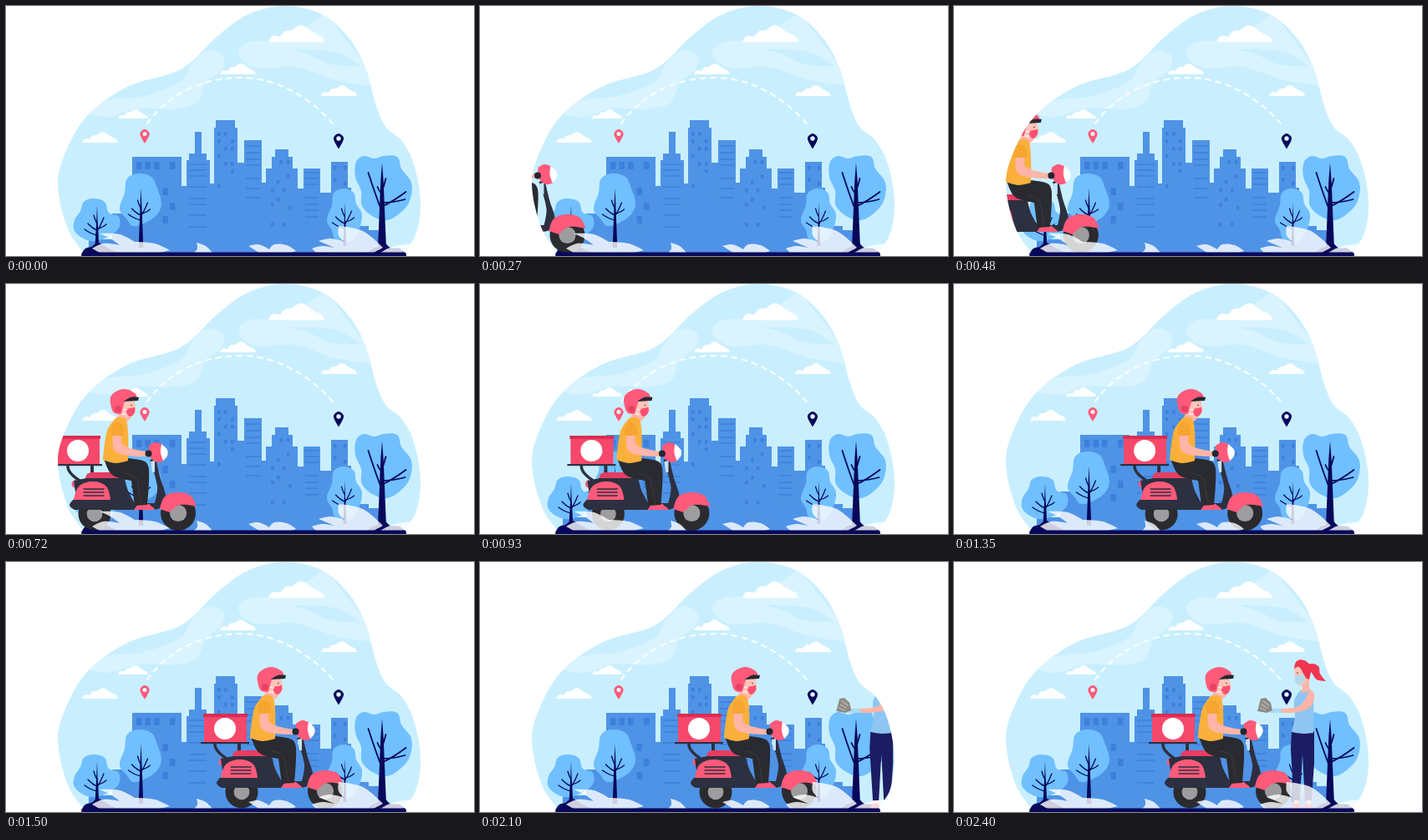
An HTML page with a canvas that plays this animation: 560x300 px, repeating every 4.73 s.

```html
<!DOCTYPE html>
<html lang="en">
<head>
<meta charset="utf-8">
<title>Scooter delivery</title>
<style>
html, body { margin: 0; width: 100%; height: 100%; overflow: hidden; background: #fff; }
canvas { display: block; }
</style>
</head>
<body>
<canvas id="stage" width="560" height="300"></canvas>
<script>
const LOOP = 4730, STEP = 30;
const ctx = document.getElementById('stage').getContext('2d');
const white = '#fff', city = '#4f93e6', shade = '#3d80dc', leaf = '#70bfff', navy = '#08085a';
const pink = '#ff5a7a', red = '#f0354f', skin = '#ffb5a7', dark = '#2d3040', black = '#2b2b2f';

// Closed curve through points [x, y]; a third value marks a sharp corner.
function outline(points) {
  const path = new Path2D(), n = points.length;
  const at = i => points[(i + n) % n];
  const handle = (i, to, side) => {
    const [x, y, corner] = at(i);
    if (corner) return [x, y];
    const dx = at(i + 1)[0] - at(i - 1)[0], dy = at(i + 1)[1] - at(i - 1)[1];
    const reach = side * Math.hypot(at(to)[0] - x, at(to)[1] - y) / 3 / (Math.hypot(dx, dy) || 1);
    return [x + dx * reach, y + dy * reach];
  };
  path.moveTo(at(0)[0], at(0)[1]);
  for (let i = 0; i < n; i++) {
    path.bezierCurveTo(...handle(i, i + 1, 1), ...handle(i + 1, i, -1), at(i + 1)[0], at(i + 1)[1]);
  }
  return path;
}
function shape(color, ...points) {
  ctx.fillStyle = color;
  ctx.fill(outline(points));
}
const poly = (color, ...points) => shape(color, ...points.map(([x, y]) => [x, y, 1]));
function box(color, x, y, w, h) {
  ctx.fillStyle = color;
  ctx.fillRect(x, y, w, h);
}
function disc(color, x, y, r) {
  ctx.fillStyle = color;
  ctx.beginPath();
  ctx.arc(x, y, r, 0, 2 * Math.PI);
  ctx.fill();
}
// Quadratic stroke from a to b, pulled towards c.
function line(color, width, a, b, c = a) {
  ctx.strokeStyle = color;
  ctx.lineWidth = width;
  ctx.lineCap = 'round';
  ctx.beginPath();
  ctx.moveTo(...a);
  ctx.quadraticCurveTo(...c, ...b);
  ctx.stroke();
}
function placed(x, y, scale, paint) {
  ctx.save();
  ctx.translate(x, y);
  ctx.scale(scale, scale);
  paint();
  ctx.restore();
}

const backdrop = outline([
  [95, 298, 1], [75, 270], [62, 214], [71, 176], [97, 132], [145, 97], [203, 79], [223, 66],
  [252, 37], [290, 10], [333, 0], [378, 10], [410, 38], [430, 74], [444, 123], [455, 146],
  [473, 161], [488, 190], [496, 237], [490, 275], [474, 298, 1]
]);
function inside(paint) {
  ctx.save();
  ctx.clip(backdrop);
  paint();
  ctx.restore();
}

const cloud = () => shape(white, [0, 13, 1], [3, 8.5], [9, 9, 1], [13, 4.5], [18, 4, 1],
  [25, 0], [32, 4, 1], [37, 7, 1], [41, 9], [43, 13, 1]);

function sky() {
  ctx.fillStyle = '#c9efff';
  ctx.fill(backdrop);
  const haze = '#d9f4ff';
  inside(() => {
    shape(haze, [90, 126, 1], [122, 113], [165, 108], [210, 90], [222, 70], [240, 54], [260, 60],
      [257, 77], [239, 92], [229, 115], [206, 123], [158, 123], [120, 133]);
    shape(haze, [278, 57], [292, 43], [330, 41], [382, 8, 1], [450, 97, 1], [395, 89], [345, 73], [298, 74]);
    shape('#c9efff', [340, 52, 1], [366, 52], [400, 57], [424, 72, 1], [388, 70], [362, 58]);
  });
  placed(314, 23, 1.56, cloud);
  placed(256, 69, 1, cloud);
  placed(134, 124, .84, cloud);
  placed(91, 151, 1, cloud);
  placed(377, 95, 1, cloud);
}

function route() {
  ctx.strokeStyle = white;
  ctx.lineWidth = 2;
  ctx.lineCap = 'round';
  ctx.setLineDash([6, 6.5]);
  ctx.beginPath();
  ctx.moveTo(169, 141);
  ctx.bezierCurveTo(195, 105, 235, 86, 281, 86);
  ctx.bezierCurveTo(325, 86, 368, 112, 394, 145);
  ctx.stroke();
  ctx.setLineDash([]);
}

// Each block stands on the ground: left, right, top.
const blocks = [
  [99, 127, 280], [127, 151, 249], [151, 210, 181], [210, 216, 216], [216, 244, 185], [219, 240, 177],
  [226, 234, 151], [244, 249, 213], [249, 277, 146], [251, 274, 137], [277, 285, 188], [285, 306, 161],
  [306, 311, 212], [311, 349, 195], [318, 343, 181], [322, 338, 172], [349, 356, 219], [356, 376, 195],
  [376, 389, 224], [389, 409, 187], [409, 413, 218], [413, 434, 264], [434, 448, 269]
];
function windows(x, gap, w, h, rows) {
  for (const [y, ...columns] of rows) columns.forEach(i => box(shade, x + i * gap, y, w, h));
}
function ledges(x, w, ...heights) {
  heights.forEach(y => box(shade, x, y - .8, w, 1.6));
}
function skyline() {
  for (const [left, right, top] of blocks) box(city, left, top, right - left, 296 - top);
  windows(156, 10.5, 6.5, 9, [[187, 0, 1, 2, 3.8], [218, 3], [236, 3.8], [252, 3]]);
  windows(253, 8, 3.5, 4.5, [[151, 0, 1], [160, 0, 2], [169, 1, 2], [178, 0], [187, 1, 2], [196, 2], [214, 0]]);
  windows(317, 7, 3.5, 4.5, [[185, 1.5, 2.7], [209, 1], [202, 2.7], [219, 0, 2], [230, 1], [236, 0], [240, 3], [260, 0, 2]]);
  windows(392, 12, 3.5, 4.5, [[192, 0, 1], [206, 0], [211, 1]]);
  ledges(219, 21, 190, 197, 204, 217, 231, 238, 251, 265);
  ledges(287, 17, 168, 176, 184, 191, 207, 219, 230);
  ledges(358, 16, 200, 207, 214, 230, 238, 245, 253);
}

function trunk(x, top, base, w) {
  poly(navy, [x - w, base], [x - w / 3, top + 22], [x, top], [x + w / 3, top + 22], [x + w, base]);
}
function branches(x, y, width, tips) {
  for (const [dx, dy, drop] of tips) line(navy, width, [x, y + drop], [x + dx, y + dy], [x + dx / 2, y + (dy + drop) / 2 + 2]);
}
const twigs = [[-15, -4, 3], [-11, -11, -3], [8, -18, -2], [11, -10, -5], [-4, -21, -11]];

function trees() {
  shape(leaf, [104, 231], [118, 235], [123, 248], [135, 253], [134, 268], [112, 281], [97, 281],
    [82, 270], [82, 257], [89, 246], [93, 235]);
  shape(leaf, [158, 201], [174, 205], [181, 219], [186, 237], [181, 250], [167, 260], [152, 264],
    [144, 255], [136, 244], [142, 224], [145, 207]);
  shape(leaf, [403, 219], [416, 224], [419, 237], [426, 250], [422, 269], [411, 283], [394, 280],
    [390, 269], [384, 257], [390, 239], [392, 225]);
  shape(leaf, [428, 180], [441, 183], [452, 180], [468, 181], [473, 195], [485, 212], [483, 234],
    [472, 248], [456, 257], [440, 253], [426, 240], [425, 222], [418, 205], [419, 187]);
  trunk(109, 239, 290, 2.5);
  trunk(161.5, 218, 290, 2.8);
  trunk(405.5, 236, 288, 2);
  trunk(450, 188, 291, 5);
  branches(109, 272, 1.3, twigs);
  branches(161.5, 254, 1.3, twigs);
  branches(405.5, 264, 1.2, twigs);
  branches(449.5, 241, 1.8, [[-16, -41, 5], [29, -18, 0], [28, -9, -5], [5, -34, -18], [-5, -24, -16]]);
  shape(navy, [90, 298, 1], [95, 291], [102, 289], [110, 284], [119, 289], [138, 298, 1]);
  shape(navy, [430, 298, 1], [439, 291], [445, 289], [452, 284], [460, 290], [471, 291], [479, 298, 1]);
}

function pin(color, x, y, scale) {
  placed(x, y, scale, () => {
    shape(color, [0, 17, 1], [-4.8, 8.5], [-5.3, 4], [0, 0], [5.3, 4], [4.8, 8.5]);
    disc('#e4f6ff', 0, 5.5, 2.5);
  });
}

function wheel(x, y, r) {
  disc(black, x, y, r);
  disc('#9d9d9f', x, y, r * .48);
}
function scooter() {
  wheel(282, 276, 19.5);
  wheel(382, 275, 21);
  box(dark, 233, 216, 58, 2.2);
  box(dark, 277, 217, 4, 12);
  line(dark, 3.5, [250, 218], [264, 236], [249, 226]);
  box('#f6486b', 237, 185, 51, 31);
  box('#d92d52', 236, 182, 53, 4);
  disc(white, 262, 200, 13);
  disc(pink, 259, 240, 4.5);
  shape(dark, [257, 236, 1], [272, 233, 1], [318, 233, 1], [322, 248], [330, 263, 1], [354, 263, 1],
    [357, 243], [348, 211, 1], [355, 209, 1], [361, 234], [367, 255], [362, 268], [352, 271, 1],
    [258, 271, 1], [252, 265], [260, 256, 1]);
  shape('#e63d61', [271, 233, 1], [273, 228], [279, 226, 1], [318, 226, 1], [318, 233, 1]);
  shape(pink, [257, 259, 1], [263, 243], [280, 237], [296, 243], [301, 259, 1]);
  [246, 250, 254].forEach(y => line(dark, 1.3, [269, y], [293, y]));
  shape(pink, [360, 270, 1], [366, 255], [382, 250], [397, 254], [404, 267, 1], [384, 265], [372, 274, 1]);
}
function rider() {
  shape(pink, [329, 271, 1], [334, 264, 1], [347, 264, 1], [354, 270, 1], [354, 271, 1]);
  shape('#2a2b30', [293, 209, 1], [319, 209, 1], [342, 213], [347, 223], [345, 265, 1], [330, 266, 1],
    [326, 236, 1], [303, 229]);
  line('#3b3c43', 1, [318, 227], [333, 235], [329, 228]);
  line('#3b3c43', 1, [333, 235], [338, 263]);
  poly(skin, [312, 152], [326, 150], [326, 160], [320, 166], [308, 163]);
  shape('#fbb03b', [307, 161, 1], [318, 161], [322, 178], [322, 212, 1], [307, 215], [292, 211, 1], [297, 176]);
  shape(skin, [304, 180, 1], [315, 180, 1], [316, 193], [344, 201, 1], [344, 207, 1], [323, 206], [306, 200]);
  shape('#f6a52f', [302, 182, 1], [303, 170], [310, 166], [316, 171], [317, 182, 1]);
  shape('#ffc4b7', [316, 140, 1], [329, 140, 1], [331, 152], [323, 160], [314, 156, 1]);
  shape('#ff4f70', [320, 150, 1], [330, 148, 1], [330, 154], [325, 159], [320, 156, 1]);
  line(white, 1, [312, 150], [321, 151]);
  line(white, 1, [313, 156], [321, 156]);
  disc('#333', 326, 145.5, .8);
  shape(pink, [302, 148], [302, 134], [317, 126], [330, 131], [333, 137, 1], [318, 141, 1], [314, 156, 1], [306, 155]);
  disc('#ea4062', 310, 150, 4);
  shape('#272832', [317, 141, 1], [325, 136], [335, 136, 1], [334, 140, 1]);
  shape(pink, [347, 194, 1], [354, 190], [362, 192, 1], [365, 212, 1], [357, 214], [348, 207]);
  shape(white, [362, 192, 1], [369, 199], [369, 206], [364, 212, 1], [361, 202]);
  disc('#25262d', 346.5, 203.5, 4);
  poly('#c4e4f5', [349, 213], [354, 212], [354, 226], [351, 226]);
}

function customer() {
  shape(red, [421, 126, 1], [427, 122], [436, 125], [438, 134], [445, 143, 1], [434, 141], [428, 133]);
  poly(skin, [416, 139], [425, 139], [425, 151], [432, 160], [411, 160], [417, 152]);
  shape('#ffc4b7', [409, 125], [423, 127], [422, 143], [413, 148], [408, 137]);
  shape(red, [407, 128, 1], [410, 119], [419, 118], [427, 126], [425, 141, 1], [421, 139], [413, 126]);
  shape('#b4daee', [408, 137, 1], [419, 135, 1], [419, 143], [412, 147], [408, 143]);
  disc('#333', 411, 133, .8);
  box(skin, 407, 282, 5, 10);
  box(skin, 422, 282, 5, 10);
  poly('#1c1c62', [404, 203], [431, 203], [431, 242], [428, 286], [420, 286], [417, 231], [414, 286], [407, 286], [403, 225]);
  poly(red, [406, 290], [414, 290], [416, 296], [403, 296]);
  poly(red, [421, 291], [429, 291], [430, 296], [418, 296]);
  shape('#8fc5f2', [414, 154, 1], [419, 157], [425, 153, 1], [430, 168], [430, 205, 1], [417, 206],
    [404, 204, 1], [408, 185], [407, 167]);
  shape(skin, [425, 153, 1], [431, 158], [427, 173], [412, 180], [388, 181, 1], [388, 176, 1], [410, 174], [419, 167]);
  shape('#aed9ef', [376, 178, 1], [383, 176], [392, 176, 1], [392, 181, 1], [375, 181, 1]);
  poly('#8c8b85', [363, 179], [367, 164], [373, 163], [379, 169], [381, 178], [374, 181]);
  for (let i = 0; i < 3; i++) line('#bdbbb2', 1.2, [366 + 2 * i, 175 - 4 * i], [373 + 2 * i, 178 - 3 * i]);
}

function grass() {
  ctx.globalAlpha = .8;
  shape(white, [103, 291, 1], [116, 285], [136, 287, 1], [125, 279], [112, 273, 1], [136, 274],
    [154, 283, 1], [178, 285], [196, 293, 1], [184, 296, 1], [112, 296, 1]);
  shape(white, [225, 296, 1], [229, 291], [228, 284, 1], [239, 288], [247, 296, 1]);
  shape(white, [290, 288, 1], [302, 286], [315, 292, 1], [321, 286], [336, 287], [347, 294, 1], [341, 296, 1], [303, 296, 1]);
  shape(white, [366, 291, 1], [378, 288], [393, 290, 1], [374, 282, 1], [388, 279], [405, 283, 1],
    [398, 275], [398, 264, 1], [427, 270], [451, 290, 1], [440, 296, 1], [371, 296, 1]);
  shape(white, [448, 296, 1], [457, 291], [470, 287], [490, 285, 1], [484, 292], [474, 296, 1]);
  ctx.globalAlpha = 1;
  shape(navy, [90, 300, 1], [92, 296], [96, 295.5, 1], [474, 295.5, 1], [478, 296], [479, 300, 1]);
}

const start = performance.now();
function draw(now) {
  // Both figures slide in at constant speed and then stop.
  const t = Math.floor(Math.max(0, now - start) % LOOP / STEP) * STEP;
  const ride = -.2256 * Math.max(0, 1500 - t);
  const walk = .211 * Math.min(570, Math.max(0, 2400 - t));
  ctx.clearRect(0, 0, 560, 300);
  sky();
  route();
  skyline();
  trees();
  pin(pink, 166, 148, 1);
  pin(navy, 398, 153, 1.08);
  inside(() => {
    placed(ride, 0, 1, () => { scooter(); rider(); });
    placed(walk, 0, 1, customer);
  });
  grass();
  requestAnimationFrame(draw);
}
draw(start);
</script>
</body>
</html>
```
